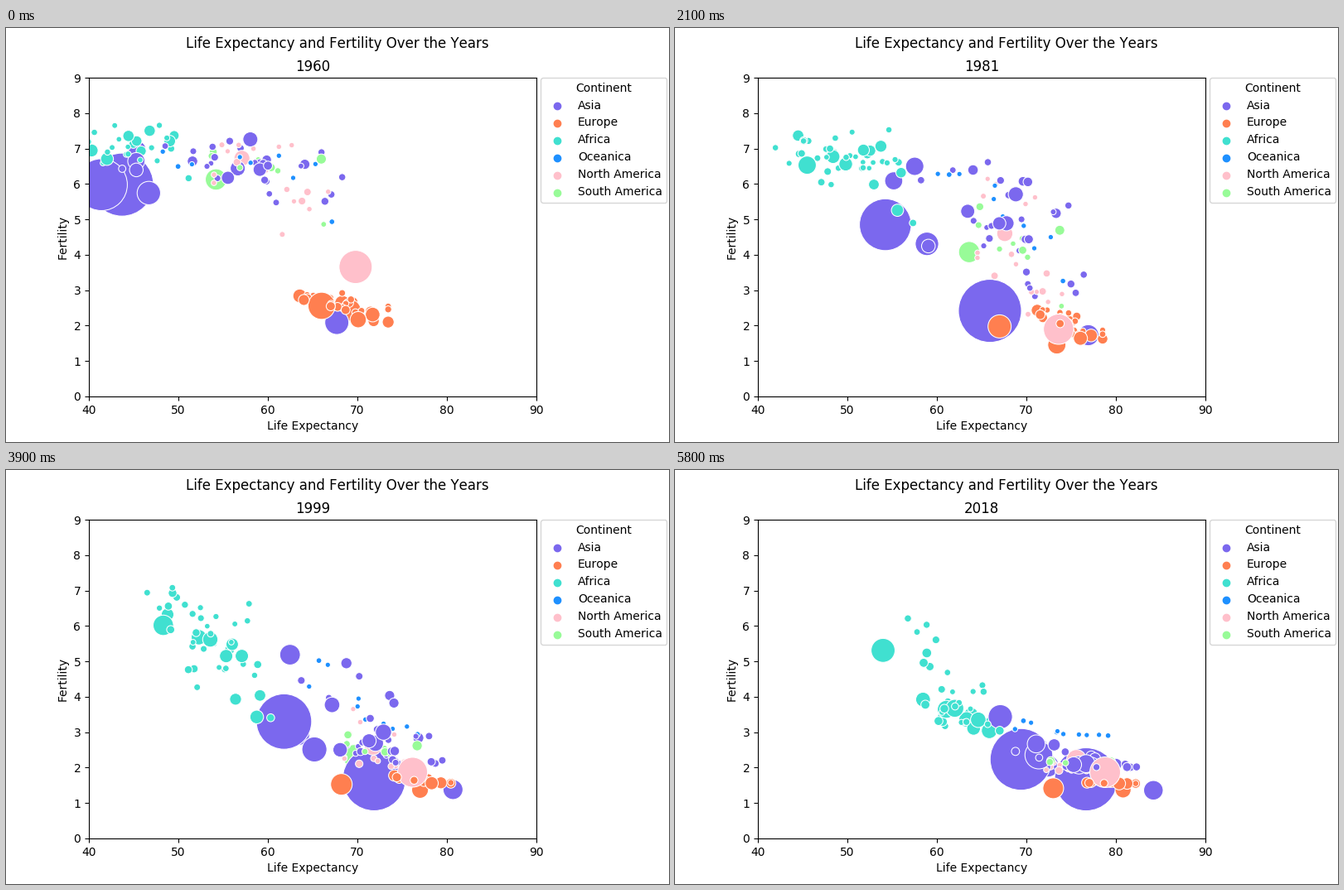
Animation of 800x500 px, one loop 5900 ms. Source, as a matplotlib script:

```python
import numpy as np
import matplotlib.pyplot as plt
from matplotlib.animation import FuncAnimation

plt.rcParams["font.family"] = "DejaVu Sans"
plt.rcParams["text.kerning_factor"] = 6

COLORS = {
    "Asia": "mediumslateblue",
    "Europe": "coral",
    "Africa": "turquoise",
    "Oceanica": "dodgerblue",
    "North America": "pink",
    "South America": "palegreen",
}
ASIA, EUROPE, AFRICA, OCEANICA, NORTH, SOUTH = COLORS

YEARS = np.arange(1960, 2019)
AGE = YEARS - YEARS[0]
U = AGE / AGE[-1]
LARGEST = 667 + 1000 * U - 252 * U ** 2  # biggest population, in millions

rng = np.random.RandomState(12)
bubbles = []


def grow(first, last):
    return first * (last / first) ** U


def live(start, jump, gain, bend=1):
    """Fast early progress that fades out, plus a steady gain."""
    return start + jump * (1 - np.exp(-AGE / 9)) + gain * U ** bend


def fall(high, low, mid, width):
    """Fertility drops along a logistic curve centred on the year mid."""
    return low + (high - low) / (1 + np.exp((YEARS - mid) / width))


def add(continent, people, life, fert, rank=None):
    rank = len(bubbles) / 14 if rank is None else rank
    bubbles.append((rank, COLORS[continent], people, life, fert))


def crowd(continent, n, pop, growth, life, spread, gain, bend, high, low, mid, scatter):
    """Smaller countries: the healthier ones start their decline earlier."""
    for _ in range(n):
        health, lag, level, size = np.clip(rng.normal(size=4), -1.9, 1.9)
        people = pop * np.exp(size)
        start = life + spread * health
        total = gain - 0.45 * spread * health
        turn = mid + 0.7 * scatter * (lag - health)
        top = high * (1 + 0.05 * level)
        add(continent, grow(people, growth * people),
            live(start, 0.4 * total, 0.6 * total, bend),
            fall(top, low, turn, 8), rng.rand())


# The largest countries
add(ASIA, grow(48, 166), live(45.4, 0, 27), fall(7, 2, 1990, 6))
add(SOUTH, grow(72, 211), live(54.2, 3, 18.5), fall(6.8, 1.6, 1980, 10.5))
add(ASIA, LARGEST, live(43.7, 19, 14), fall(6, 1.67, 1976.3, 3))
add(EUROPE, grow(73, 82), live(69.2, 0, 11.6), fall(2.5, 1.37, 1971, 4))
add(ASIA, grow(450, 1354), live(41.4, 5, 23), fall(6.4, 1.75, 1990, 13))
add(ASIA, grow(88, 267), live(46.7, 6, 18.7), fall(5.8, 2.35, 1982.5, 5.5))
add(ASIA, grow(93, 127), live(67.7, 6, 10.5), fall(2.1, 1.36, 1981, 5))
add(NORTH, grow(38, 126), live(57.1, 7, 11.5), fall(7, 2.2, 1981, 7.5))
add(AFRICA, grow(45, 196), live(37, 9, 8, 3), fall(6.7, 5, 2003, 10))
add(ASIA, grow(45, 201), live(45.3, 8, 13.8), fall(6.65, 3.2, 2001, 6.5))
add(ASIA, grow(26, 106), live(59.1, 0, 12), fall(7, 2, 1990, 15))
add(EUROPE, grow(120, 145), live(66, 1, 6, 4), fall(2.7, 1.4, 1979, 9))
add(ASIA, grow(27, 82), live(45.3, 4, 28), fall(6.9, 2, 1979.5, 9))
add(NORTH, grow(181, 327), live(69.8, 1, 8), fall(4.5, 1.87, 1963, 4))

crowd(AFRICA, 44, 3.5, 4.5, 42, 5, 20, 3, 7, 3, 2007, 12)
crowd(ASIA, 30, 5, 3.2, 55, 7, 20, 1, 6.8, 2, 1987, 11)
crowd(EUROPE, 32, 6, 1.2, 68.5, 2.6, 11, 1, 2.75, 1.55, 1976, 8)
crowd(OCEANICA, 10, 0.3, 2, 56, 6, 17, 1, 6.7, 2.9, 1983, 12)
crowd(NORTH, 18, 1.5, 2.2, 59, 6, 16, 1, 6.9, 1.9, 1979, 10)
crowd(SOUTH, 9, 4, 2.6, 58, 5, 17, 1, 6.7, 2.1, 1980, 9)

bubbles.sort(key=lambda b: b[0])
face = [b[1] for b in bubbles]
people, life, fert = (np.array([b[k] for b in bubbles]) for k in (2, 3, 4))
sizes = 20 + 2980 * people / LARGEST

fig, ax = plt.subplots(figsize=(8, 5), dpi=100)
fig.subplots_adjust(left=0.125, right=0.8, bottom=0.11, top=0.88)
fig.suptitle("Life Expectancy and Fertility Over the Years", fontsize=12)
ax.set(xlim=(40, 90), ylim=(0, 9), xlabel="Life Expectancy", ylabel="Fertility")
ax.set_yticks(range(10))
title = ax.set_title("1960", fontsize=12)
dots = ax.scatter(life[:, 0], fert[:, 0], s=sizes[:, 0], c=face,
                  edgecolor="white", linewidth=0.75)
for name, color in COLORS.items():
    ax.scatter([], [], color=color, label=name)
ax.legend(title="Continent", loc="upper left", bbox_to_anchor=(1.01, 1), borderaxespad=0)


def update(i):
    dots.set_offsets(np.column_stack((life[:, i], fert[:, i])))
    dots.set_sizes(sizes[:, i])
    title.set_text(str(YEARS[i]))
    return dots, title


anim = FuncAnimation(fig, update, frames=len(YEARS), interval=100, repeat=True, repeat_delay=0)
plt.show()
```
